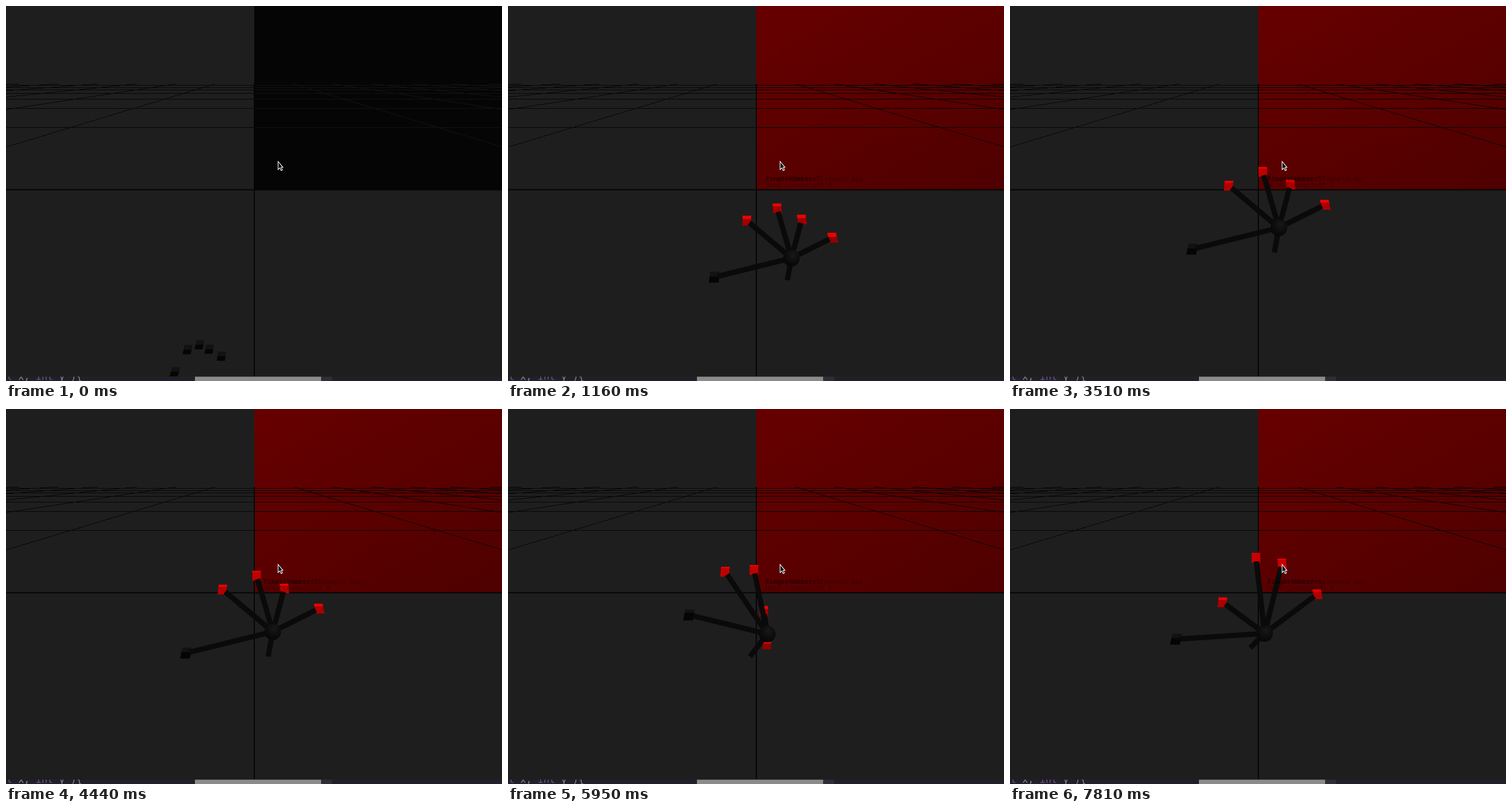
Animation of 861 by 650 pixels, one loop 7.91 s. Source, as an HTML page:

```html
<!DOCTYPE html>
<html lang="en">
<head>
<meta charset="utf-8">
<title>Hand tracking</title>
<style>
  html, body { margin: 0; width: 100%; height: 100%; overflow: hidden; background: #1e1e1e; }
  svg { display: block; width: 861px; height: 650px; }
  text { font-family: "DejaVu Sans Mono", monospace; white-space: pre; }
</style>
</head>
<body>
<svg viewBox="0 0 861 650">
  <defs>
    <linearGradient id="red" gradientUnits="userSpaceOnUse" x1="431" y1="0" x2="675" y2="420">
      <stop offset="0" stop-color="#670000"/>
      <stop offset="1" stop-color="#4f0000"/>
    </linearGradient>
    <radialGradient id="ball" cx=".58" cy=".32" r=".7">
      <stop offset="0" stop-color="#181818"/>
      <stop offset=".5" stop-color="#0e0e0e"/>
      <stop offset="1" stop-color="#060606"/>
    </radialGradient>
    <clipPath id="view"><rect width="861" height="642.5"/></clipPath>
    <clipPath id="bar"><rect y="642.5" width="861" height="8"/></clipPath>
  </defs>
  <g clip-path="url(#view)">
    <rect width="861" height="643" fill="#1e1e1e"/>
    <rect id="panel" x="431" width="430" height="318"/>
    <g fill="none" shape-rendering="crispEdges">
      <path id="gridL" stroke="#060606"/>
      <path id="gridR"/>
    </g>
    <path d="M0 318.5H861M431 135V643" stroke="#050505" stroke-width="2"/>
    <g id="hand"></g>
    <g id="label" font-size="11.25" fill="#0c0000">
      <text x="447" y="303" opacity=".65">FingerNumber:5</text>
      <text x="447" y="303" opacity=".38">Simple Motion Example App</text>
      <text x="447" y="314" opacity=".38">Hand Connected? 1</text>
    </g>
  </g>
  <g clip-path="url(#bar)">
    <rect y="642" width="861" height="8" fill="#20202a"/>
    <rect x="328" y="642" width="219" height="8" fill="#8b8b8b"/>
    <rect x="547" y="642" width="19" height="8" fill="#2e2e37"/>
    <text x="1" y="648" font-size="16.8" fill="#85858a"><tspan fill="#76508a">t</tspan> x, <tspan fill="#76508a">int</tspan> y ){</text>
  </g>
  <path d="M472.3 269.5V283.5L475.5 280.6L477.6 285.2L479.8 284.2L477.8 279.8H480.8Z" fill="#080808" stroke="#fff" stroke-width="1.1"/>
</svg>
<script>
const LOOP = 7910, SEEN = 210, FOUND = 390, START = 1160, LAST = 57;
const TICK = (7810 - START) / LAST;
const $ = id => document.getElementById(id);

// Hand shapes: thumb, index, middle, ring, pinky and wrist, relative to the palm
const fan = [[-150, 37], [-87, -73], [-28, -97], [20, -75], [80, -40], [-8, 43]];
const fold = [[-135, -33], [-73, -108], [-23, -111], [-6, -40], [-1, 18], [-30, 39]];
const reach = [[-153, 10], [-73, -54], [-15, -131], [30, -121], [91, -68], [-25, 25]];
const curl = [[-121, -63], [-87, -100], [-44, -105], [-34, -42], [-60, 29], [-3, 8]];

const place = (shape, x, y, size = 1) => [...shape, [0, 0]].map(([u, v]) => [x + u * size, y + v * size]);
const mix = (p, q, u) => p.map(([x, y], i) => [x + (q[i][0] - x) * u, y + (q[i][1] - y) * u]);

const rest = place(fan, 346, 621, 0.35);
const keys = [
  [-8, place(fan, 503, 485, 1.05)],
  [0, place(fan, 492, 437, 0.89)],
  [7, place(fan, 472, 390)],
  [13, place(fan, 470, 383)],
  [28, place(fan, 463, 386)],
  [41, place(fold, 450, 390)],
  [45, place(reach, 450, 381)],
  [49, place(reach, 453, 378)],
  [51, place(curl, 453, 380)],
  [LAST, place(reach, 442, 389)]
];

function poseAt(n) {
  const i = Math.max(1, keys.findIndex(k => k[0] >= n));
  const [a, p] = keys[i - 1], [b, q] = keys[i];
  return mix(p, q, (n - a) / (b - a));
}

// The picture advances in even ticks
function tickAt(t) {
  if (t < FOUND) return -8;
  if (t < START) return Math.floor((t - FOUND) / 110) - 7;
  return Math.min(LAST, Math.floor((t - START + 1) / TICK));
}

function grid(side) {
  const mid = 431, horizon = 114.5, far = 135, edge = mid + side * mid;
  let d = "";
  for (let k = 2; k < 9; k++) {
    const y = Math.floor(horizon + 181.8 / (k - 0.096) + 0.2) + 0.5;
    d += `M${edge} ${y}H${mid}`;
  }
  for (let k = 1; k <= 6; k++) {
    const dx = 68 * k;
    d += `M${mid + side * dx} ${far}L${edge} ${horizon + (far - horizon) * mid / dx}`;
  }
  return d;
}

// Lower cubes show more of their top; cubes off centre lean
function cube([x, y], size, lit) {
  const front = lit ? `rgb(${Math.round(300 - 0.38 * y)},0,0)` : "#050505";
  const top = lit ? "#f20000" : "#121212";
  const h = size / 2, lean = (431 - x) * 0.02;
  const t = y - h - 1, m = t + Math.min(8, Math.max(2, (y - 200) * 0.035));
  return `<path d="M${x - h} ${m}h${size}L${x + h - lean} ${y + h + 1}h${-size}Z" fill="${front}"/>` +
    `<path d="M${x - h + lean / 2} ${t}h${size}L${x + h} ${m}h${-size}Z" fill="${top}"/>`;
}

function bone([x, y], [px, py], gap) {
  const u = Math.min(1, gap / Math.hypot(px - x, py - y));
  return `<path d="M${x + (px - x) * u} ${y + (py - y) * u}L${px} ${py}" stroke="#0a0a0a" stroke-width="9.2"/>`;
}

function drawHand(pose, lit, whole) {
  const tips = pose.slice(0, 5), [wrist, palm] = pose.slice(5);
  let out = tips.map((p, i) => cube(p, whole ? (i ? 15 : 17) : 14, lit && i > 0)).join("");
  if (whole) {
    out += tips.map(p => bone(p, palm, 6)).join("") + bone(wrist, palm, 0);
    out += `<circle cx="${palm[0]}" cy="${palm[1]}" r="14.5" fill="url(#ball)"/>`;
  }
  $("hand").innerHTML = out;
}

function render(t) {
  const lit = t >= FOUND, whole = t >= SEEN;
  $("panel").setAttribute("fill", lit ? "url(#red)" : "#050505");
  $("gridR").setAttribute("stroke", lit ? "#060606" : "#121212");
  $("label").setAttribute("visibility", lit ? "visible" : "hidden");
  drawHand(whole ? poseAt(tickAt(t)) : rest, lit, whole);
}

function frame() {
  render(performance.now() % LOOP);
  requestAnimationFrame(frame);
}

$("gridL").setAttribute("d", grid(-1));
$("gridR").setAttribute("d", grid(1));
frame();
</script>
</body>
</html>
```
